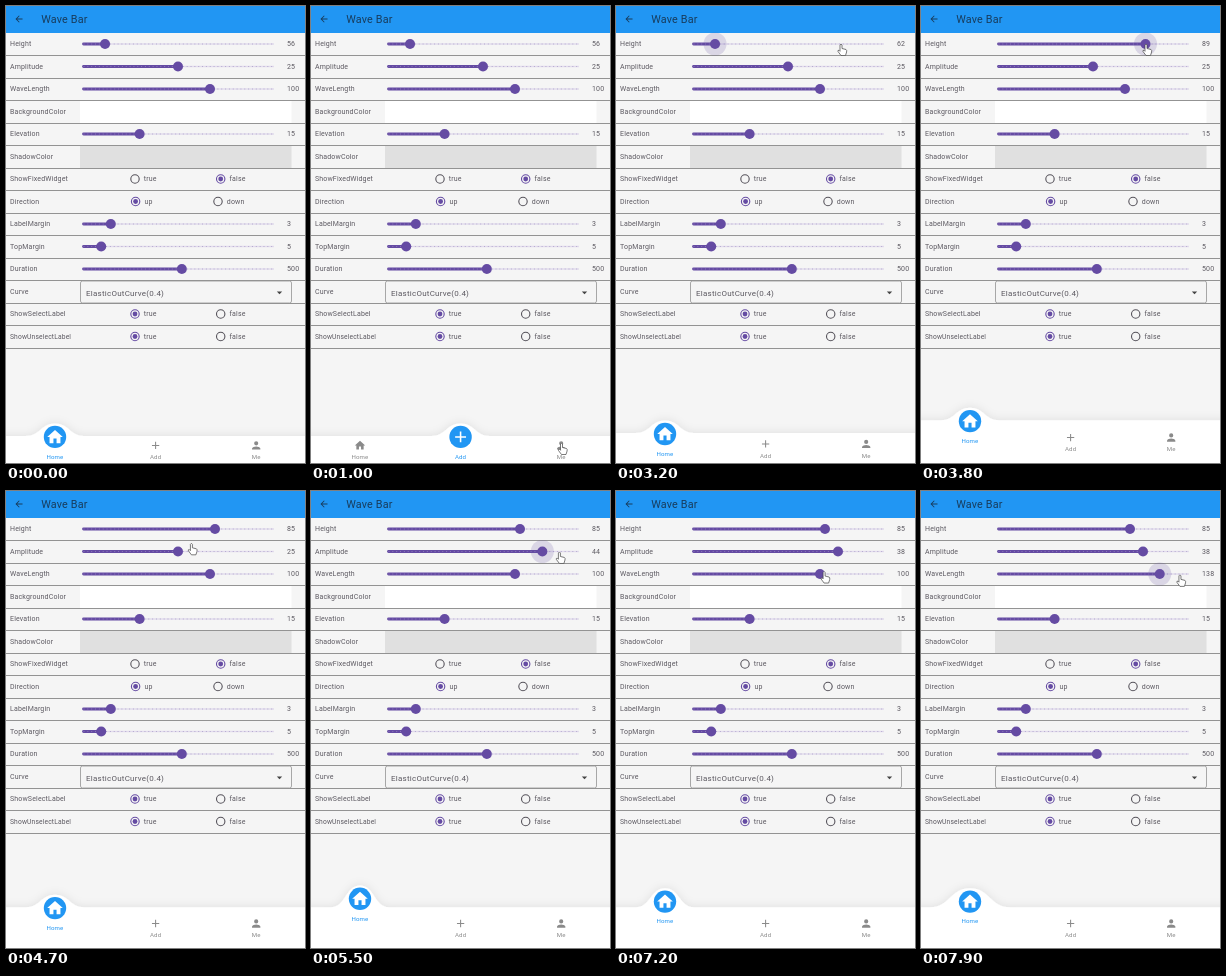
These frames come from a looping animation (299x457 px, 8000 ms). An HTML page:

```html
<!DOCTYPE html>
<html lang="en">
<head>
<meta charset="utf-8">
<title>Wave Bar</title>
<style>
  html, body { margin: 0; width: 100%; height: 100%; overflow: hidden; background: #f5f5f5; }
  svg { display: block; width: 299px; height: 457px; }
  text { font: 7px Roboto, sans-serif; letter-spacing: .15px; fill: #5c5961; white-space: pre; }
  .title { font-size: 10.8px; fill: #183c5c; }
  .pick { font-size: 8px; letter-spacing: .24px; }
  .fit { font-size: 6.7px; }
  .tab { font-size: 6.1px; letter-spacing: .1px; text-anchor: middle; }
</style>
</head>
<body>
<svg viewBox="0 0 299 457">
  <defs>
    <filter id="soft" x="-10%" y="-60%" width="120%" height="220%">
      <feDropShadow dx="0" dy="-1" stdDeviation="4" flood-color="#000" flood-opacity=".08"/>
    </filter>
  </defs>
  <g id="page"></g>
  <g id="live"></g>
</svg>
<script>
const LOOP = 8000, BLUE = '#2196f3', PURPLE = '#654ba3', GREY = '#8a8a8a', LINE = '#939393';
const LEFT = 76, WIDTH = 192;
const rowY = i => 38 + 22.5 * i;
const tabX = i => 49 + 100.6 * i;
const $ = id => document.getElementById(id);

const icons = {
  back: 'M20 11H7.8l5.6-5.6L12 4l-8 8 8 8 1.4-1.4L7.8 13H20z',
  Home: 'M10 20v-6h4v6h5v-8h3L12 3 2 12h3v8z',
  Add: 'M19 13h-6v6h-2v-6H5v-2h6V5h2v6h6z',
  Me: 'M12 12a4 4 0 1 0 0-8 4 4 0 0 0 0 8zm0 2c-2.7 0-8 1.3-8 4v2h16v-2c0-2.7-5.3-4-8-4z'
};
const tabs = ['Home', 'Add', 'Me'];
const labels = ['Height', 'Amplitude', 'WaveLength', 'BackgroundColor', 'Elevation', 'ShadowColor', 'ShowFixedWidget',
  'Direction', 'LabelMargin', 'TopMargin', 'Duration', 'Curve', 'ShowSelectLabel', 'ShowUnselectLabel'];

// Pointer stops: time, x, y
const stops = [
  [100, 250, 108], [500, 148, 443], [700, 148, 443], [1000, 250, 437], [1500, 250, 437], [1800, 52, 436],
  [2050, 52, 436], [2200, 85, 415], [2400, 126, 204], [3000, 224.5, 38], [4000, 224.5, 38], [4200, 209, 38],
  [4400, 209, 38], [4900, 172, 60], [5050, 172, 60], [5550, 250, 61], [6200, 150, 65], [6640, 222, 67],
  [6900, 222, 67], [7300, 205, 83], [7550, 205, 83], [8000, 266, 84]
];
// The first three rows are dragged between two times
const drags = [
  { rest: 56, min: 50, max: 100, from: 3120, to: 4400 },
  { rest: 25, min: 0, max: 50, from: 5050, to: 6900 },
  { rest: 100, min: 0, max: 150, from: 7550, to: LOOP }
];
const clicks = [{ time: 650, tab: 1 }, { time: 1150, tab: 2 }, { time: 1750, tab: 0 }];

const clamp = v => Math.max(0, Math.min(1, v));
const mix = (a, b, p) => a + (b - a) * p;
const smooth = p => p * p * (3 - 2 * p);
const elasticOut = p => p >= 1 ? 1 : 1 + 2 ** (-10 * p) * Math.sin((p - .1) * Math.PI * 5);

function pointer(t) {
  const i = Math.max(1, stops.findIndex(s => s[0] > t)), a = stops[i - 1], b = stops[i];
  const p = smooth(clamp((t - a[0]) / (b[0] - a[0])));
  return [mix(a[1], b[1], p), mix(a[2], b[2], p)];
}

// Share of the track that is filled
function level(d, t) {
  const rest = (d.rest - d.min) / (d.max - d.min);
  if (t < d.from) return rest;
  const held = clamp((pointer(Math.min(t, d.to - 1))[0] - LEFT) / WIDTH);
  return mix(rest, held, smooth(clamp((t - d.from) / 150)));
}

const text = (x, y, s, extra = '') => `<text x="${x}" y="${y}" ${extra}>${s}</text>`;
const rect = (x, y, w, h, fill, extra = '') => `<rect x="${x}" y="${y}" width="${w}" height="${h}" fill="${fill}" ${extra}/>`;
const circle = (x, y, r, extra) => `<circle cx="${x}" cy="${y}" r="${r}" ${extra}/>`;
const icon = (name, x, y, scale, fill) =>
  `<path d="${icons[name]}" fill="${fill}" transform="translate(${x} ${y}) scale(${scale}) translate(-12 -12)"/>`;
const line = (x1, x2, y, stroke, width, extra = '') =>
  `<path d="M${x1} ${y}H${x2}" stroke="${stroke}" stroke-width="${width}" ${extra}/>`;

function slider(row, share, value, halo) {
  const x = LEFT + WIDTH * share, y = rowY(row), dots = 'stroke-dasharray="1 2.84"';
  return line(LEFT + 1, LEFT + WIDTH, y, '#e2dcec', 1.6) + line(LEFT + 1, LEFT + WIDTH, y, '#b5a9d0', 1.2, dots)
    + line(LEFT + 1.5, x, y, PURPLE, 2.8, 'stroke-linecap="round"') + line(LEFT + 1.5, x, y, '#8f7cbd', .9, dots)
    + (halo ? circle(x, y, 11.5, `fill="${PURPLE}" fill-opacity=".18"`) : '')
    + circle(x, y, 5, `fill="${PURPLE}"`) + text(281, y + 2.4, value);
}

function radio(row, x, label, on) {
  const y = rowY(row), color = on ? PURPLE : '#55525a';
  return circle(x, y, 4.2, `fill="none" stroke="${color}" stroke-width="1.1"`)
    + (on ? circle(x, y, 2.4, `fill="${color}"`) : '') + text(x + 8.8, y + 2.4, label);
}

function drawPage() {
  let s = rect(0, 0, 299, 457, '#f5f5f5') + rect(0, 0, 299, 27, BLUE)
    + icon('back', 13, 13, .44, '#183c5c') + text(35.3, 16.5, 'Wave Bar', 'class="title"')
    + rect(74, 95, 211.5, 22, '#fff') + rect(74, 140, 211.5, 22, '#e0e0e0');
  labels.forEach((label, i) => {
    s += line(0, 299, Math.floor(rowY(i) + 11.6) + .5, LINE, 1)
      + text(4, rowY(i) + 2.4, label, label.length > 16 ? 'class="fit"' : '');
  });
  s += slider(4, .3, 15) + slider(8, .15, 3) + slider(9, .1, 5) + slider(10, .52, 500);
  for (const row of [6, 12, 13]) s += radio(row, 129, 'true', row > 6) + radio(row, 214.7, 'false', row == 6);
  s += radio(7, 129.6, 'up', true) + radio(7, 212, 'down')
    + rect(74.5, 275, 211, 22, 'none', `rx="2" stroke="${LINE}" stroke-width=".8"`)
    + text(80, 290.1, 'ElasticOutCurve(0.4)', 'class="pick"')
    + '<path d="M270.8 285.5h5.4l-2.7 2.7z" fill="#444"/>';
  $('page').innerHTML = s;
}

function bar(t, height, amplitude, waveLength) {
  let active = 0, x = tabX(0);
  for (const { time, tab } of clicks) if (t >= time) {
    x = mix(tabX(active), tabX(tab), elasticOut((t - time) / 500));
    active = tab;
  }
  const top = 457 - height * .482, mid = (top + 457) / 2, peak = top - amplitude * .5;
  const cy = top + .9 - (amplitude - 25) * .5, half = waveLength * .29, bend = half / 2;
  let s = `<path filter="url(#soft)" fill="#fff" d="M-40 ${top}H${x - half}
    C${x - bend} ${top} ${x - bend} ${peak} ${x} ${peak}
    C${x + bend} ${peak} ${x + bend} ${top} ${x + half} ${top}H340V480H-40Z"/>`
    + circle(x, cy, 11.2, `fill="${BLUE}"`) + icon(tabs[active], x, cy, .78, '#fff');
  tabs.forEach((name, i) => {
    const on = i == active;
    if (!on) s += icon(name, tabX(i), mid - 4.1, .52, GREY);
    s += text(on ? x : tabX(i), on ? cy + 21.7 : mid + 9.5, name, `class="tab" style="fill:${on ? BLUE : GREY}"`);
  });
  return s;
}

function cursor(t) {
  if (t < 100) return '';
  const [x, y] = pointer(t), hand = y > 428 || y < 118;
  const d = hand
    ? 'M-1 1Q0-1 1 1V4.5L5 5.5Q6 6 5.6 8L4.5 11.5H0L-3 7.5Q-3.5 6-2 6.3L-1 7.3Z'
    : 'M0 0V8L1.8 6.4 3 9.2 4.3 8.6 3.1 5.9H5.5Z';
  return `<path d="${d}" transform="translate(${x + .5} ${y})" fill="#fff" stroke="#444" stroke-width=".7" stroke-linejoin="round"/>`;
}

function draw(t) {
  // Values trail the pointer, thumbs trail the values
  const values = drags.map(d => mix(d.min, d.max, level(d, t - 40)));
  const sliders = drags.map((d, i) =>
    slider(i, level(d, t - 110), Math.round(values[i]), t >= d.from - 150 && t < d.to + 50));
  $('live').innerHTML = sliders.join('') + bar(t, ...values) + cursor(t);
}

drawPage();
const begin = performance.now();
(function frame() {
  draw((performance.now() - begin) % LOOP);
  requestAnimationFrame(frame);
})();
</script>
</body>
</html>
```
